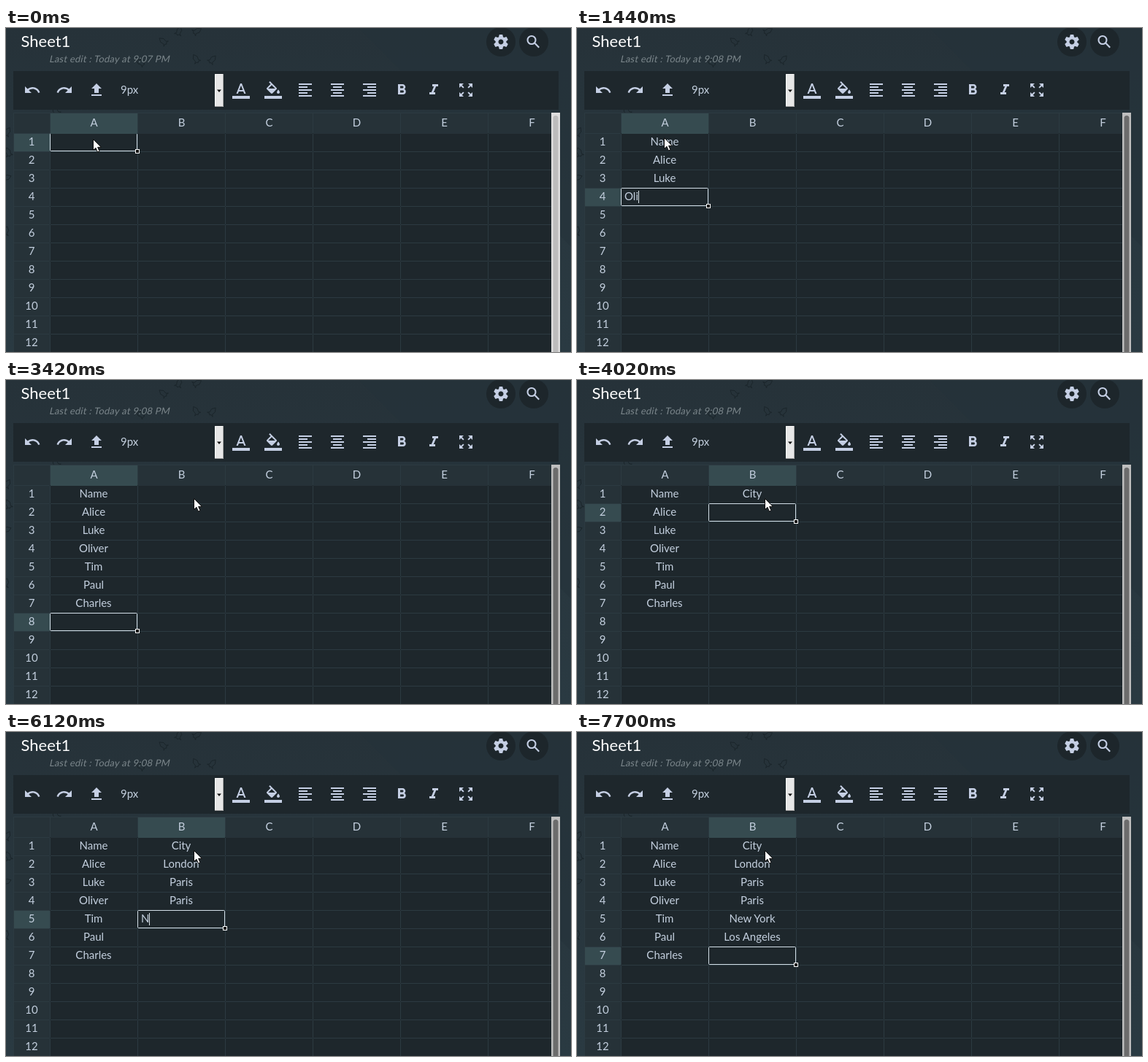
Animation, 774 px wide and 444 px high, one loop 8 s. Source, as an HTML page:

```html
<!DOCTYPE html>
<html lang="en">
<head>
<meta charset="utf-8">
<title>Sheet</title>
<style>
  html, body { margin: 0; width: 100%; height: 100%; overflow: hidden; background: #28353b; }
  svg { display: block; }
  text { font: 15px Lato, "Open Sans", sans-serif; fill: #c3cfde; white-space: pre; }
  .mid { text-anchor: middle; }
  .title { font-size: 22px; fill: #fff; }
  .edit { font-size: 13px; letter-spacing: .25px; fill: #7b868b; }
  .icon { fill: #c5cfe4; }
  .doodle { fill: none; stroke: #1b252a; stroke-width: 1.1; }
  .line { stroke: #2c3a41; }
  .head { fill: #263238; }
  .lit { fill: #364b50; }
  .box { fill: none; stroke: #d3dfe8; }
</style>
</head>
<body>
<svg id="stage" width="774" height="444" viewBox="0 0 774 444">
  <defs>
    <linearGradient id="bg" x1="0" y1="0" x2="0" y2="1">
      <stop offset="0" stop-color="#263239"/>
      <stop offset="1" stop-color="#2a3a42"/>
    </linearGradient>
    <path id="rocket" d="M0-8L4-2L3 4L6 7L2 6L0 8L-2 6L-6 7L-3 4L-4-2Z"/>
  </defs>
  <rect width="774" height="444" fill="url(#bg)"/>
  <path d="M484 0H774V300Z" fill="#24323a" opacity=".5"/>
  <g id="doodles" class="doodle"></g>

  <text class="title" x="20.5" y="26">Sheet1</text>
  <g transform="translate(59 47) skewX(-12)"><text id="stamp" class="edit"></text></g>

  <g fill="#1d262b"><circle cx="678" cy="19" r="20"/><circle cx="723" cy="19" r="20"/></g>
  <g id="gear" class="icon" transform="translate(678 19)">
    <circle r="5.4" fill="none" stroke="#c5cfe4" stroke-width="3.8"/>
  </g>
  <g transform="translate(710.5 7)" fill="none" stroke="#c5cfe4" stroke-width="2.1">
    <circle cx="9.5" cy="9.5" r="5.5"/><path d="M13.6 13.6L19.7 19.7"/>
  </g>

  <rect x="10" y="59" width="747" height="53" fill="#1e272c"/>
  <text x="157" y="90">9px</text>
  <rect x="286" y="63" width="12" height="45" fill="#e7e7e7"/>
  <path d="M286.5 108V63.5H298" fill="none" stroke="#f8f8f8"/>
  <path d="M297.5 63V107.5H286" fill="none" stroke="#a5a5a5"/>
  <path d="M289 84.5h6l-3 3.5z" fill="#111"/>
  <g id="icons" class="icon"></g>

  <rect x="10" y="116" width="737" height="328" fill="#1e272c"/>
  <g id="grid" class="line"></g>
  <g id="cells"></g>
  <rect id="select" class="box" width="119" height="24" rx="1"/>
  <g id="heads"></g>
  <rect id="handle" width="5" height="5" fill="#111" stroke="#fff"/>
  <path id="caret" stroke="#dbe4ea" d="M.5 4V21"/>

  <rect id="track" x="747" y="116" width="12" height="328"/>
  <rect id="thumb" x="749.5" y="120" width="7" height="340" rx="3.5"/>
  <path id="mouse" d="M.5.5V15.5L4 12.3L6.4 18L9 16.9L6.6 11.4H11.3Z" fill="#fff" stroke="#111"/>
</svg>
<script>
const LOOP = 8000, CLICK = 3480;
const $ = id => document.getElementById(id);
const add = (parent, tag, attrs, text) => {
  const el = document.createElementNS("http://www.w3.org/2000/svg", tag);
  for (const k in attrs) el.setAttribute(k, attrs[k]);
  if (text !== undefined) el.textContent = text;
  return parent.appendChild(el);
};
const put = (el, x, y) => el.setAttribute("transform", `translate(${x} ${y})`);
const colX = c => 60 + 120 * c;
const rowY = r => 144 + 25 * r;

// Faint background doodles: x, y, angle
[[215, 18, -50], [237, 4, 20], [262, 4, 60], [260, 42, -30], [283, 43, 40], [184, 47, -60],
 [2, 142, 30], [3, 170, -20], [1, 205, 70], [0, 278, 15], [68, 114, -40]].forEach(([x, y, a]) =>
  add($("doodles"), "use", { href: "#rocket", transform: `translate(${x} ${y}) rotate(${a}) scale(.8)` }));

for (let a = 0; a < 360; a += 60)
  add($("gear"), "path", { d: "M-3.2-6L-2.2-10H2.2L3.2-6Z", transform: `rotate(${a})` });

// Toolbar icons on a 24px box
const undo = "M12.5 8c-2.65 0-5.05.99-6.9 2.6L2 7v9h9l-3.62-3.62c1.39-1.16 3.16-1.88 5.12-1.88 3.54 0 6.55 2.31 7.6 5.5l2.37-.78C21.08 11.03 17.15 8 12.5 8z";
const bars = x => `M3 3h18v2H3zM${x} 7h12v2H${x}zM3 11h18v2H3zM${x} 15h12v2H${x}zM3 19h18v2H3z`;
const icon = (cx, d, extra = "") =>
  add($("icons"), "path", { d, transform: `translate(${cx - 12} 73) ${extra}` });
icon(36, undo);
icon(80, undo, "translate(24 0) scale(-1 1)");
icon(124, "M9 16h6v-6h4l-7-7-7 7h4zM5 18h14v2H5z");
icon(322, "M0 20h24v4H0zM11 3L5.5 17h2.25l1.12-3h6.25l1.12 3h2.25L13 3zm-1.38 9L12 5.67 14.38 12z");
icon(366, "M16.56 8.94L7.62 0 6.21 1.41l2.38 2.38-5.15 5.15c-.59.59-.59 1.54 0 2.12l5.5 5.5c.59.59 1.53.59 2.12 0l5.5-5.5c.59-.58.59-1.53 0-2.12zM5.21 10L10 5.21 14.79 10zM19 11.5s-2 2.17-2 3.5c0 1.1.9 2 2 2s2-.9 2-2c0-1.33-2-3.5-2-3.5zM0 20h24v4H0z");
icon(410, bars(3));
icon(454, bars(6));
icon(498, bars(9));
icon(542, "M15.6 10.79c.97-.67 1.65-1.77 1.65-2.79 0-2.26-1.75-4-4-4H7v14h7.04c2.09 0 3.71-1.7 3.71-3.79 0-1.52-.86-2.82-2.15-3.42zM10 6.5h3c.83 0 1.5.67 1.5 1.5s-.67 1.5-1.5 1.5h-3zm3.5 9H10v-3h3.5c.83 0 1.5.67 1.5 1.5s-.67 1.5-1.5 1.5z");
icon(586, "M10 4v3h2.21l-3.42 8H6v3h8v-3h-2.21l3.42-8H18V4z");
for (let a = 0; a < 360; a += 90)
  icon(630, "M15 3l2.3 2.3-2.89 2.87 1.42 1.42L18.7 6.7 21 9V3z", `rotate(${a} 12 12)`);

// Grid lines stop short of the crossings
for (let r = 0; r < 12; r++)
  for (let c = 0; c < 6; c++) {
    const x = colX(c), y = rowY(r), right = Math.min(x + 120, 747);
    add($("grid"), "path", { d: `M${x + 1} ${y + 25.5}H${right}M${x + .5} ${y + 1}V${y + 25}` });
  }

// Headings
const heading = (x, y, w, h, label, base) => {
  const box = add($("heads"), "rect", { x, y, width: w, height: h, class: "head" });
  add($("heads"), "text", { x: label > 0 ? 35 : x + 59.5, y: base, class: "mid" }, label);
  return box;
};
add($("heads"), "rect", { x: 11, y: 117, width: 49, height: 28, class: "head" });
const cols = [..."ABCDEF"].map((s, c) =>
  heading(colX(c) + 1, 117, c < 5 ? 119 : 86, 28, s, 135));
const rows = Array.from({ length: 12 }, (_, r) =>
  heading(11, rowY(r) + 1, 49, 24, r + 1, rowY(r) + 17));
let lines = "M10.5 116V444M10 116.5H747M60.5 117V144";
for (let c = 1; c < 6; c++) lines += `M${colX(c) + .5} 117V144`;
for (let r = 0; r < 12; r++) lines += `M11 ${rowY(r) + .5}H60`;
add($("heads"), "path", { d: lines, class: "line" });

// column, row, text, first key, time per key, enter
const entries = [
  [0, 0, "Name", 260, 40, 440],
  [0, 1, "Alice", 620, 50, 920],
  [0, 2, "Luke", 1000, 50, 1240],
  [0, 3, "Oliver", 1320, 60, 1720],
  [0, 4, "Tim", 1820, 60, 2120],
  [0, 5, "Paul", 2300, 50, 2560],
  [0, 6, "Charles", 2700, 43, 3160],
  [1, 0, "City", 3660, 60, 4020],
  [1, 1, "London", 4440, 48, 4840],
  [1, 2, "Paris", 4980, 60, 5360],
  [1, 3, "Paris", 5560, 60, 5900],
  [1, 4, "New York", 6120, 70, 6860],
  [1, 5, "Los Angeles", 7020, 48, 7700]
].map(([c, r, word, start, key, enter]) =>
  ({ c, r, word, start, key, enter, el: add($("cells"), "text", { y: rowY(r) + 17 }) }));

const ramp = (t, a, b) => Math.min(1, Math.max(0, (t - a) / (b - a)));
const gray = v => `rgb(${v},${v},${v})`;

function draw(t) {
  let col = 0, row = 0, typing = null;
  if (t >= CLICK) col = 1;
  for (const e of entries) {
    const done = t >= e.enter, n = done ? e.word.length : Math.floor((t - e.start) / e.key) + 1;
    e.el.textContent = e.word.slice(0, Math.max(0, n));
    e.el.setAttribute("class", done ? "mid" : "");
    e.el.setAttribute("x", colX(e.c) + (done ? 60 : 5));
    if (done && e.c === col) row = e.r + 1;
    if (!done && n > 0) typing = e;
  }

  cols.forEach((el, i) => el.setAttribute("class", i === col ? "lit" : "head"));
  rows.forEach((el, i) => el.setAttribute("class", i === row ? "lit" : "head"));
  put($("select"), colX(col) + .5, rowY(row) + .5);
  put($("handle"), colX(col) + 117.5, rowY(row) + 22.5);
  $("caret").style.display = typing ? "" : "none";
  if (typing)
    put($("caret"), Math.round(colX(col) + 5 + typing.el.getComputedTextLength()), rowY(row));

  $("stamp").textContent = `Last edit : Today at 9:0${t < 1440 ? 7 : 8} PM`;

  const fade = ramp(t, 60, 120);
  $("track").setAttribute("fill", gray(Math.round(222 - 32 * fade)));
  $("thumb").setAttribute("fill", gray(Math.round(188 - 80 * fade)));

  const p = ramp(t, 3200, 3410), ease = p * p * (3 - 2 * p);
  put($("mouse"), 119 + 138 * ease, (t < 100 ? 152 : 150) + 12 * ease);
}

const begin = performance.now();
function frame() {
  draw((performance.now() - begin) % LOOP);
  requestAnimationFrame(frame);
}
frame();
</script>
</body>
</html>
```
